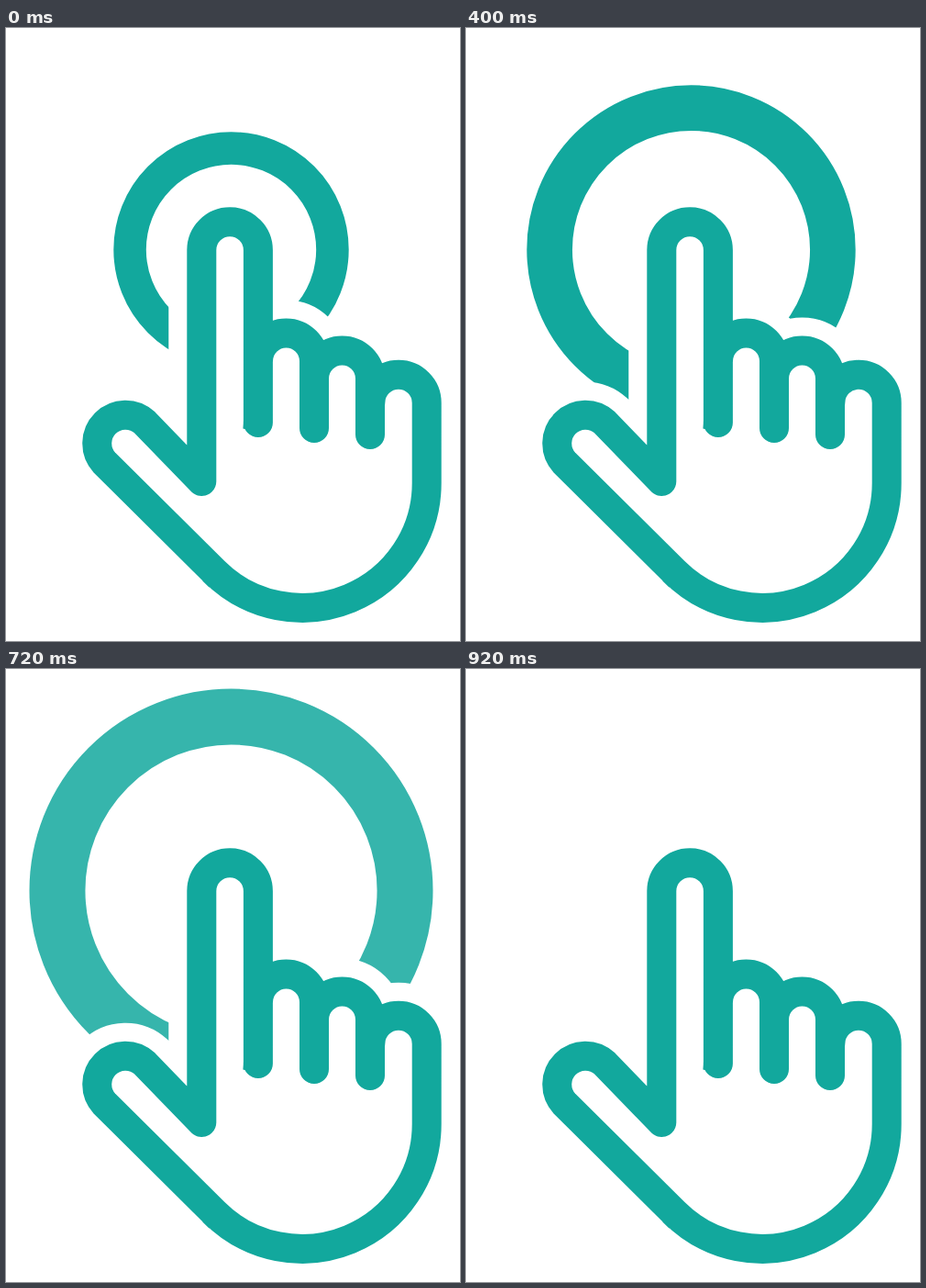
Animation, 495 px wide and 668 px high, one loop 1.6 s. Source, as an HTML page:

```html
<!DOCTYPE html>
<html lang="en">
<head>
<meta charset="utf-8">
<title>Tap</title>
<style>
  html, body { margin: 0; width: 100%; height: 100%; overflow: hidden; background: #fff; }
  svg { display: block; width: 495px; height: 668px; }
</style>
</head>
<body>
<svg viewBox="0 0 495 668" fill="none" stroke-linecap="round" stroke-linejoin="round">
  <defs>
    <path id="hand" d="M213.3 494V242A30.8 30.8 0 0 1 274.9 242V430
      M275 363A30.5 30.5 0 0 1 336 363V436
      M336 382A30.5 30.5 0 0 1 397 382V443
      M397.3 408.5A30.7 30.7 0 0 1 458.7 408.5V496
      A135.8 135.8 0 0 1 226.9 592.1L107.4 473.6
      A31 31 0 0 1 151.2 429.8L213.3 494"/>
  </defs>
  <circle id="ring" cx="245.5" cy="241.5" stroke="#12a89d"/>
  <!-- white gap around the hand -->
  <rect x="213" y="400" width="246" height="100" fill="#fff"/>
  <use href="#hand" stroke="#fff" stroke-width="72"/>
  <use href="#hand" stroke="#12a89d" stroke-width="32"/>
  <path d="M259 428L258.4 436.5L262 437.5ZM214 602L221.5 609.5L226 606Z" fill="#12a89d"/>
</svg>
<script>
  const LOOP = 1600, STEP = 40, RING_END = 920, FADE_START = 640, FADE_TIME = 520;
  const INNER = 0.723; // inner radius relative to outer
  const ring = document.getElementById('ring');

  function draw(time) {
    const t = Math.floor((time % LOOP) / STEP) * STEP;
    const outer = 128.2 + 0.1275 * t;
    const fade = Math.max(0, t - FADE_START) / FADE_TIME;
    ring.setAttribute('r', outer * (1 + INNER) / 2);
    ring.setAttribute('stroke-width', outer * (1 - INNER));
    ring.setAttribute('opacity', t < RING_END ? 1 - fade : 0);
  }

  const start = performance.now();
  function tick() {
    draw(performance.now() - start);
    requestAnimationFrame(tick);
  }
  tick();
</script>
</body>
</html>
```
